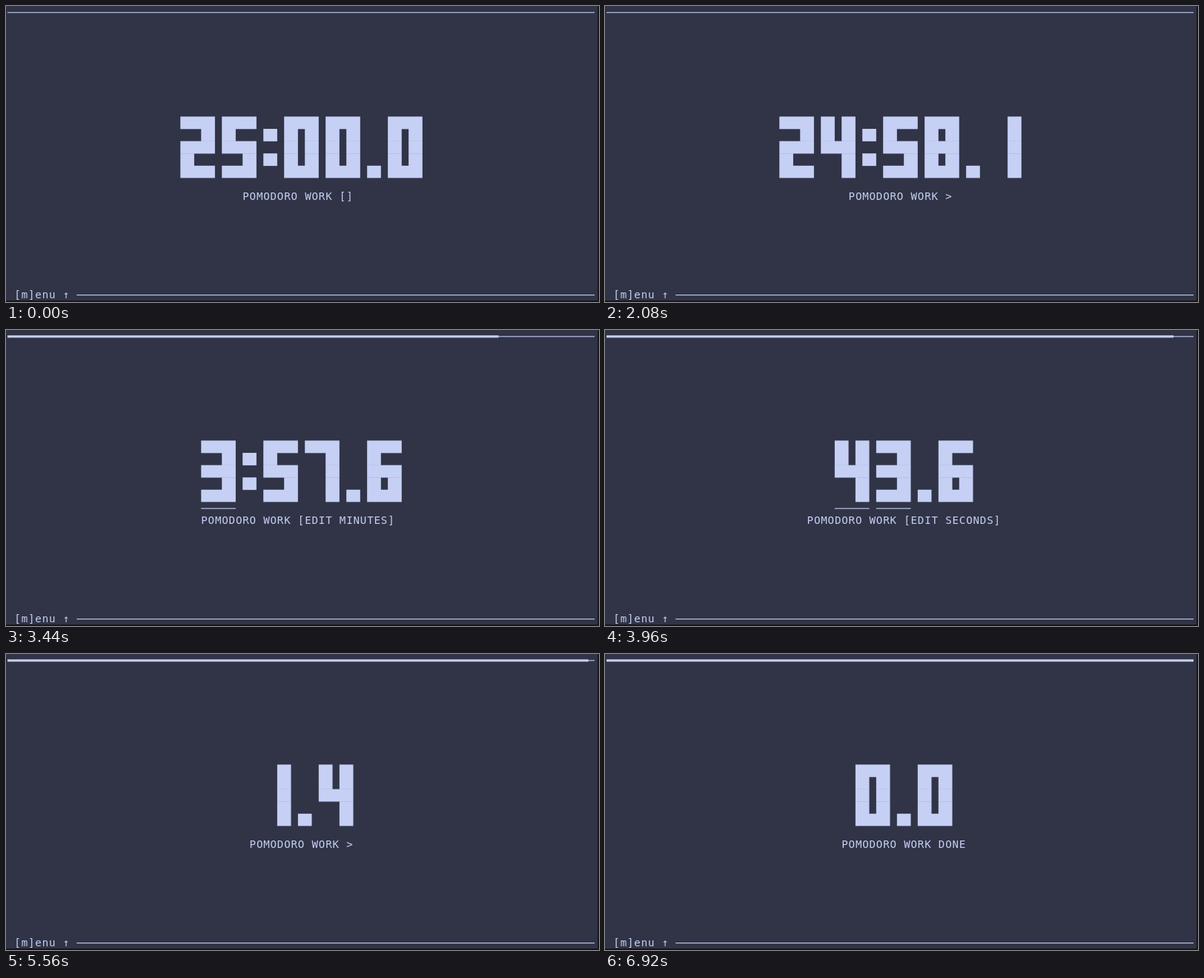
Recreate the animation shown at these times as an HTML page with a canvas. Size 800x400 px, loop 8000 ms.

```html
<!DOCTYPE html>
<html lang="en">
<head>
<meta charset="utf-8">
<title>Pomodoro timer</title>
<style>
  html, body { margin: 0; width: 100%; height: 100%; overflow: hidden; background: #303446; }
  canvas { display: block; }
</style>
</head>
<body>
<canvas id="stage" width="800" height="400"></canvas>
<script>
const ctx = document.getElementById('stage').getContext('2d');
const LOOP = 8000, FRAME = 40;
const COLS = 85, CW = 9.33, CH = 16.6, LEFT = 2, RIGHT = 794;
const BG = '#303446', FG = '#c6d0f5', EDGE = '#17171b';

// Cell patterns, five rows each
const A = '11111', L = '11000', R = '00011', B = '11011';
const GLYPHS = {
  0: [A, B, B, B, A], 1: [R, R, R, R, R], 2: [A, R, A, L, A], 3: [A, R, A, R, A],
  4: [B, B, A, R, R], 5: [A, L, A, R, A], 6: [A, L, A, B, A], 7: [A, R, R, R, R],
  8: [A, B, A, B, A], 9: [A, B, A, R, A],
  ':': ['00', '11', '00', '11', '00'], '.': ['00', '00', '00', '00', '11']
};

const colX = col => LEFT + col * CW;

// Number of periodic events that have happened by time t
const count = (t, start, period, max) =>
  t < start ? 0 : Math.min(max, Math.floor((t - start) / period) + 1);

// Remaining time in tenths of a second, plus mode
function stateAt(t) {
  if (t < 320) return { tenths: 15000, mode: '[]' };
  if (t >= 6920) return { tenths: 0, mode: 'DONE' };
  if (t >= 5400) return { tenths: 16 - count(t, 5462.6, 97.3, 15), mode: '>' };

  const tenths = 15000 - count(t, 300, 98, 24);
  if (t < 2600) return { tenths, mode: '>' };

  const presses = count(t, 2824, 30.5, 80);
  const minutes = Math.min(presses, 24), seconds = presses - minutes;
  return {
    tenths: tenths - minutes * 600 - seconds * 10,
    mode: minutes < 24 ? '[EDIT MINUTES]' : '[EDIT SECONDS]'
  };
}

function format(tenths) {
  const min = Math.floor(tenths / 600);
  const sec = Math.floor(tenths / 10) % 60;
  const head = min ? min + ':' + String(sec).padStart(2, '0') : String(sec);
  return head + '.' + tenths % 10;
}

function text(str, col, row) {
  const y = row * CH + 13.1;
  [...str].forEach((ch, i) => {
    if (ch !== ' ') ctx.fillText(ch, colX(col + i), y);
  });
}

function rule(from, to, row, thick) {
  const x = colX(from), end = Math.min(colX(to), RIGHT);
  const h = thick ? 3.1 : 1.1;
  ctx.fillRect(x, (row + 0.5) * CH + 0.5 - h / 2, end - x, h);
}

function glyph(ch, col, row) {
  GLYPHS[ch].forEach((bits, r) => {
    for (const run of bits.matchAll(/1+/g)) {
      const y = (row + r) * CH;
      ctx.fillRect(colX(col + run.index), y, run[0].length * CW, CH + (r < 4 ? 0.3 : 0));
    }
  });
}

function clock(str, col, mode) {
  const colon = str.indexOf(':'), dot = str.indexOf('.');
  [...str].forEach((ch, i) => {
    const width = GLYPHS[ch][0].length;
    glyph(ch, col, 9);
    const edited = mode === '[EDIT MINUTES]' ? i < colon
      : mode === '[EDIT SECONDS]' && i > colon && i < dot;
    if (edited) rule(col, col + width, 14);
    col += width + 1;
  });
}

function draw(t) {
  const { tenths, mode } = stateAt(t);
  const digits = format(tenths), label = 'POMODORO WORK ' + mode;

  ctx.fillStyle = BG;
  ctx.fillRect(0, 0, 800, 400);
  ctx.fillStyle = EDGE;
  ctx.fillRect(798, 0, 2, 400);
  ctx.fillRect(0, 398, 800, 2);

  ctx.fillStyle = FG;
  ctx.font = '14.2px "DejaVu Sans Mono", monospace';

  const percent = Math.floor((15000 - tenths) / 150);
  const done = Math.round(percent * COLS / 100);
  rule(0, COLS, 0);
  if (done) rule(0, done, 0, true);

  const width = [...digits].reduce((w, ch) => w + GLYPHS[ch][0].length + 1, -1);
  const block = Math.max(width, label.length);
  const start = Math.round((COLS - block) / 2);
  clock(digits, start + Math.round((block - width) / 2), mode);
  text(label, start + Math.floor((block - label.length) / 2), 15);

  text('[m]enu ↑', 1, 23);
  rule(10, COLS, 23);
}

const begin = performance.now();
function tick() {
  const t = (performance.now() - begin) % LOOP;
  draw(Math.floor(t / FRAME) * FRAME);
  requestAnimationFrame(tick);
}
tick();
</script>
</body>
</html>
```
